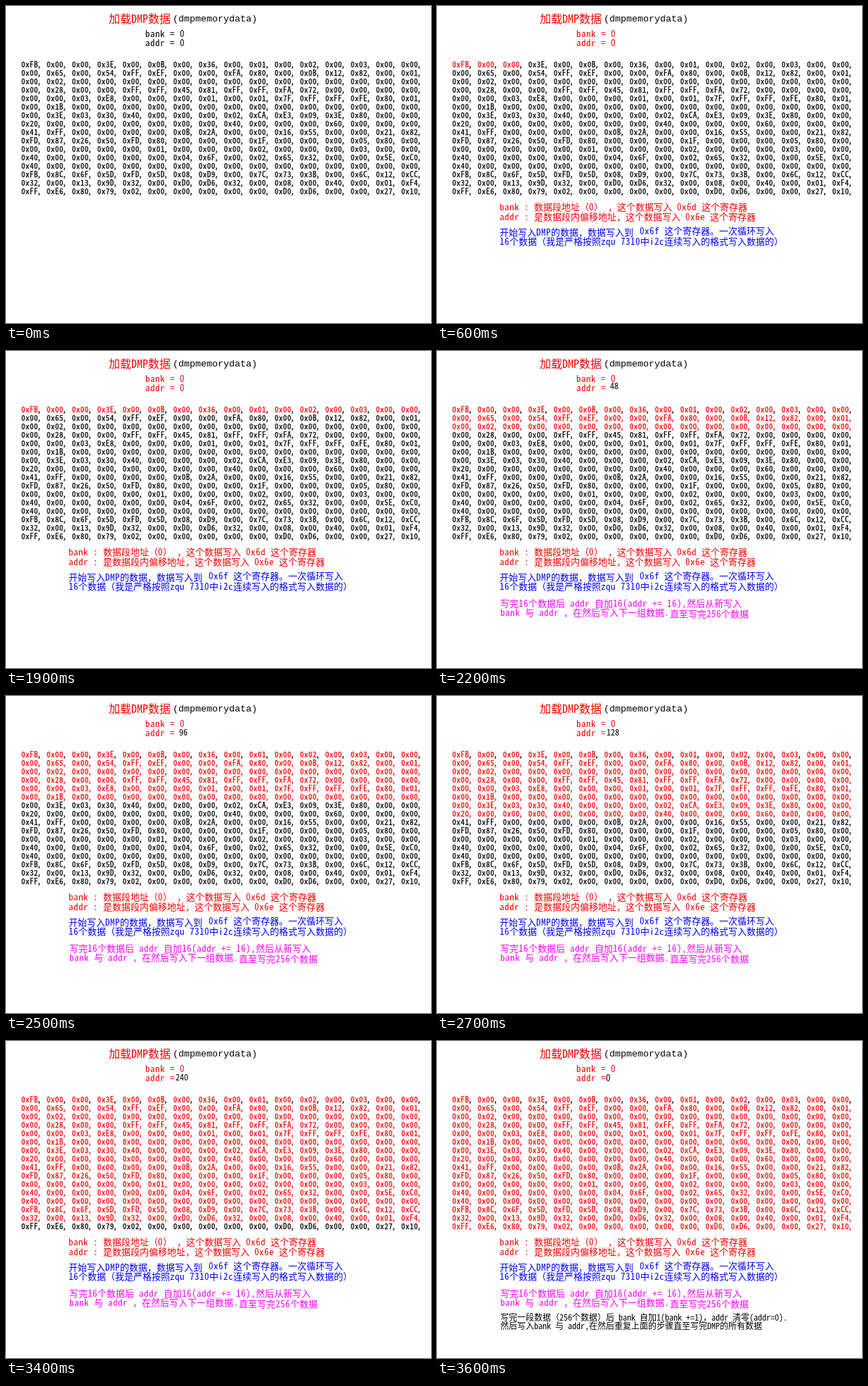
Animation, 604 px wide and 450 px high, one loop 3700 ms. Source, as an HTML page:

```html
<!DOCTYPE html>
<html lang="zh-CN">
<head>
<meta charset="utf-8">
<title>DMP</title>
<style>
html, body { margin: 0; width: 100%; height: 100%; overflow: hidden; background: #fff; }
svg { display: block; width: 604px; height: 450px; }
text {
  font-family: "Noto Sans Mono CJK SC", "Noto Sans Mono", "Noto Sans CJK SC", monospace;
  white-space: pre;
  text-spacing-trim: space-all;
  text-autospace: no-autospace;
  font-kerning: none;
  color: #000;
  fill: currentColor;
}
.name { font: 13.333px "Liberation Mono", monospace; }
.row { stroke: currentColor; stroke-width: .25px; }
.red { color: #f00; }
.blue { color: #00f; }
.pink { color: #f0f; }
.off { visibility: hidden; }
</style>
</head>
<body>
<svg id="stage" viewBox="0 0 604 450"></svg>
<script>
const STEP = 100, STEPS = 37;
const stage = document.getElementById('stage');
const pen = document.createElement('canvas').getContext('2d');

function make(tag, parent, attrs, content = '') {
  const el = document.createElementNS('http://www.w3.org/2000/svg', tag);
  for (const key in attrs) el.setAttribute(key, attrs[key]);
  el.textContent = content;
  return parent.appendChild(el);
}

// Spacing that puts Latin characters on a fixed pitch
function spacing(size, pitch) {
  pen.font = `${size}px "Noto Sans Mono CJK SC", "Noto Sans Mono", "Noto Sans CJK SC", monospace`;
  return pitch - pen.measureText('0').width;
}

function line(x, y, size, pitch, content, color = '') {
  const el = make('text', stage, { x, y, 'font-size': size, class: color });
  const gap = `letter-spacing:${spacing(size, pitch)}px`;
  for (const run of content.split(/([\x20-\x7e]+)/)) {
    if (run) make('tspan', el, /^[\x20-\x7e]/.test(run) ? { style: gap } : {}, run);
  }
  return el;
}

line(146, 24, 16, 8, '加载DMP数据', 'red');
make('text', stage, { x: 237, y: 22, class: 'name' }, '(dmpmemorydata)');

const bank = line(198, 44, 13, 7, 'bank = 0');
const addr = line(198, 57, 13, 7, 'addr =');
const firstZero = line(247, 57, 13, 7, '0');
const lastZero = line(240, 57, 13, 7, '0');
const count = make('text', stage, {
  'font-size': 12, style: `letter-spacing:${spacing(12, 6)}px`
});

// Empty entries stand for 00
const rows = `FB,,,3E,,0B,,36,,01,,02,,03
,65,,54,FF,EF,,,FA,80,,0B,12,82,,01
,02
,28,,,FF,FF,45,81,FF,FF,FA,72
,,03,E8,,,,01,,01,7F,FF,FF,FE,80,01
,1B
,3E,03,30,40,,,,02,CA,E3,09,3E,80
20,,,,,,,,40,,,,60
41,FF,,,,,0B,2A,,,16,55,,,21,82
FD,87,26,50,FD,80,,,,1F,,,,05,80
,,,,,01,,,,02,,,,03
40,,,,,,04,6F,,02,65,32,,,5E,C0
40
FB,8C,6F,5D,FD,5D,08,D9,,7C,73,3B,,6C,12,CC
32,,13,9D,32,,D0,D6,32,,08,,40,,01,F4
FF,E6,80,79,02,,,,,,D0,D6,,,27,10`.split('\n').map((row, r) => {
  const values = row.split(',');
  const el = make('text', stage, {
    y: 87 + 12 * r, class: 'row', 'font-size': 11,
    style: `letter-spacing:${spacing(11, 6)}px`
  });
  const cells = Array.from({ length: 16 }, (_, c) => {
    const cell = make('tspan', el, { x: 21.7 + 36 * c }, '0x' + (values[c] || '00'));
    make('tspan', el, { dx: -1.5 }, ',');
    return cell;
  });
  return { el, cells };
});

// Each note: the step it appears at, then its lines
const notes = [
  [1, line(89, 290, 13, 7, 'bank : 数据段地址（0） ，这个数据写入 0x6d 这个寄存器', 'red')],
  [2, line(89, 304, 13, 7, 'addr : 是数据段内偏移地址，这个数据写入 0x6e 这个寄存器', 'red')],
  [3,
    line(89, 326, 13, 7, '开始写入DMP的数据，数据写入到', 'blue'),
    line(288, 324, 13, 7, '0x6f 这个寄存器。一次循环写入', 'blue'),
    line(89, 339, 13, 7, '16个数据（我是严格按照zqu 7310中i2c连续写入的格式写入数据的）', 'blue')],
  [20,
    line(90, 363, 13, 7, '写完16个数据后 addr 自加16(addr += 16),然后从新写入', 'pink'),
    line(90, 376, 13, 7, 'bank 与 addr ，在然后写入下一组数据.', 'pink'),
    line(331, 378, 13, 7, '直至写完256个数据', 'pink')],
  [36,
    line(90, 397, 12, 6, '写完一段数据（256个数据）后 bank 自加1(bank +=1)，addr 清零(addr=0).'),
    line(90, 409, 12, 6, '然后写入bank 与 addr,在然后重复上面的步骤直至写完DMP的所有数据')]
];

const red = (el, on) => el.classList.toggle('red', on);
const show = (el, on) => el.classList.toggle('off', !on);

function draw(step) {
  red(bank, step >= 1);
  red(addr, step >= 2);
  red(firstZero, step >= 2);
  show(firstZero, step < 20);
  show(lastZero, step === 36);

  const done = step - 19;
  show(count, step >= 20 && step < 36);
  count.textContent = 16 * done;
  count.setAttribute('x', done < 7 ? 246 : 241);
  count.setAttribute('y', step < 25 ? 54 : 56);

  // The first row fills cell by cell, the others whole
  rows[0].cells.forEach((cell, c) => red(cell, step >= c + 4));
  rows.slice(1).forEach((row, r) => red(row.el, step >= r + 21));

  for (const [from, ...lines] of notes) lines.forEach(el => show(el, step >= from));
}

let last = -1;
function tick() {
  const step = Math.floor(performance.now() / STEP) % STEPS;
  if (step !== last) draw(last = step);
  requestAnimationFrame(tick);
}
tick();
</script>
</body>
</html>
```
